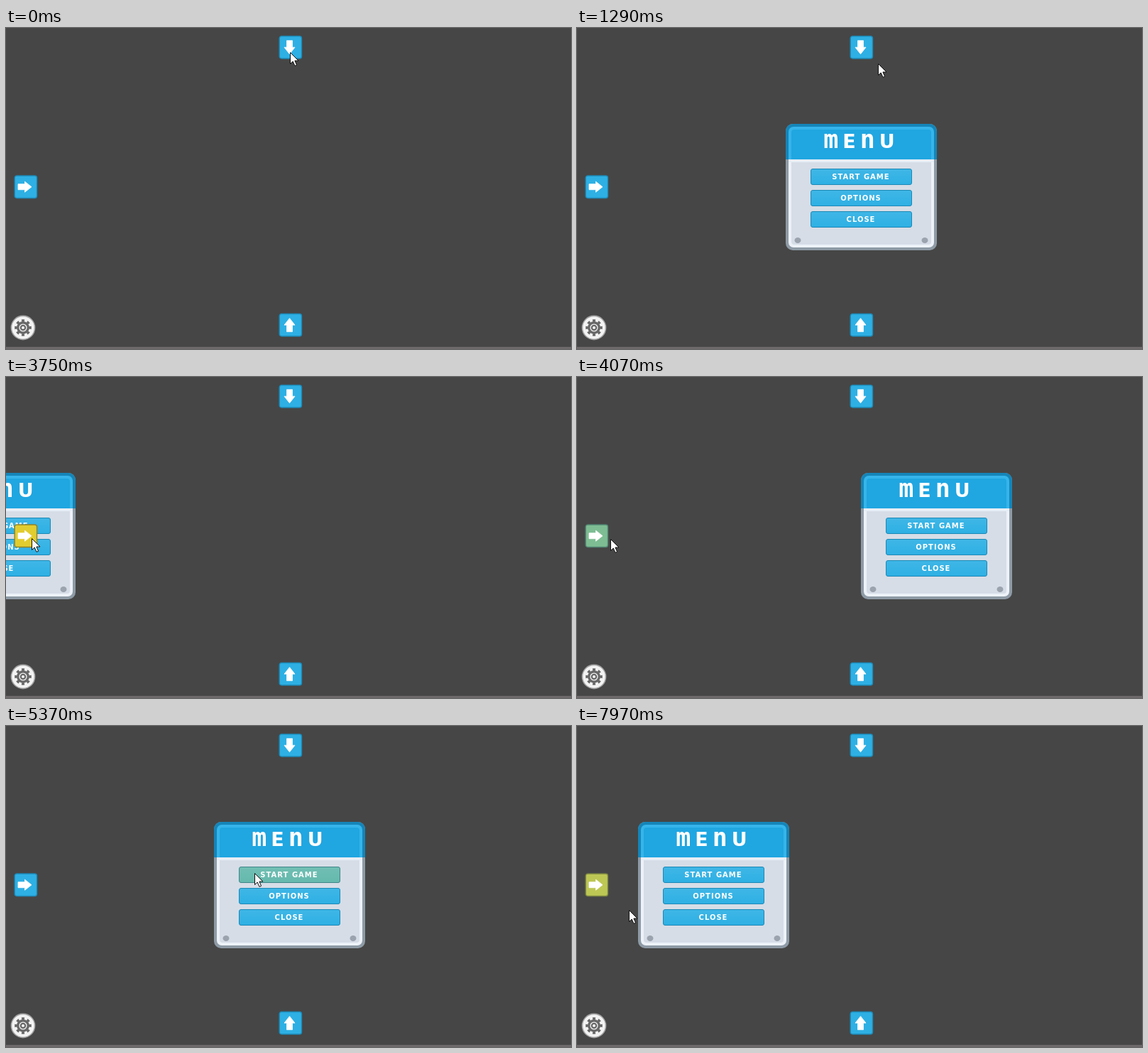
These frames come from a looping animation (796 by 452 pixels, 8 s). An HTML page:

```html
<!DOCTYPE html>
<html lang="en">
<head>
<meta charset="utf-8">
<title>Sliding menu</title>
<style>
  html, body { margin: 0; width: 100%; height: 100%; overflow: hidden; background: #464646; }
  svg { display: block; width: 796px; height: 452px; }
  text { font-family: "DejaVu Sans", sans-serif; font-weight: bold; fill: #fff; text-anchor: middle; }
  .title { font-size: 27px; letter-spacing: 6px; }
  .unicase { font-family: "DejaVu Sans Mono", monospace; font-size: 35px; }
  .label { font-size: 10px; letter-spacing: 1px; }
</style>
</head>
<body>
<svg viewBox="0 0 796 452">
  <defs>
    <linearGradient id="shine" x2="0" y2="1">
      <stop stop-color="#fff" stop-opacity=".08"/>
      <stop offset="1" stop-color="#fff" stop-opacity="0"/>
    </linearGradient>
    <clipPath id="head"><rect width="213" height="50"/></clipPath>
    <path id="arrow" d="M-4-9.5H4V0H7.5L0 9.5-7.5 0H-4Z" fill="#fff" stroke="#fff" stroke-width=".8" stroke-linejoin="round"/>
  </defs>
  <rect width="796" height="452" fill="#464646"/>
  <rect y="449" width="796" height="3" fill="#6d696a"/>

  <g transform="translate(24 422)">
    <circle r="16.6" fill="#f3f3f3" stroke="#a3a3a3" stroke-width="1.6"/>
    <circle r="9" fill="#686868"/>
    <circle r="10" fill="none" stroke="#686868" stroke-width="3.6" pathLength="16" stroke-dasharray="1" stroke-dashoffset=".5"/>
    <circle r="5.6" fill="#f3f3f3"/>
    <circle r="3.2" fill="none" stroke="#686868" stroke-width="2.2"/>
  </g>

  <g id="panel">
    <rect width="213" height="178" rx="10" fill="#8e9ba6"/>
    <rect x="4" y="4" width="205" height="170" rx="7" fill="#edf2f8"/>
    <rect x="8" y="8" width="197" height="162" rx="4" fill="#d6dde7"/>
    <g clip-path="url(#head)">
      <rect width="213" height="178" rx="10" fill="#1585b8"/>
      <rect x="4" y="4" width="205" height="170" rx="7" fill="#36b5ea"/>
      <rect x="8" y="8" width="197" height="162" rx="4" fill="#20a6e1"/>
    </g>
    <rect x="4" y="50" width="205" height="4" fill="#e8eef5"/>
    <text class="title" x="106.5" y="34"><tspan class="unicase">m</tspan>E<tspan class="unicase">n</tspan>U</text>
    <ellipse cx="17" cy="164" rx="4.5" ry="4" fill="#9ba3ae"/>
    <ellipse cx="196" cy="164" rx="4.5" ry="4" fill="#9ba3ae"/>
    <g id="items"></g>
  </g>
  <g id="arrows"></g>
  <path id="cursor" d="M.5.5V16.5L4.2 13 7 19.3 9.6 18.2 6.9 12H12Z" fill="#fff" stroke="#111"/>
</svg>
<script>
const LOOP = 8000, FADE = 200, SLIDE = 890, SPRING = 1960;
const HOME = [294, 135], ABOVE = [294, -181], LEFT = [-266, 135];
const $ = id => document.getElementById(id);
const clamp = v => Math.min(1, Math.max(0, v));
const mix = (a, b, k) => a + (b - a) * k;
const mixColor = (a, b, k) => `rgb(${a.map((v, i) => Math.round(mix(v, b[i], k)))})`;

const quartOut = u => 1 - (1 - u) ** 4;
const elasticOut = u => u <= 0 ? 0 : u >= 1 ? 1
  : 1 + 2 ** (-10 * u) * Math.sin((10 * u - 0.75) * 2 * Math.PI / 3);

const moves = [
  { at: 408, span: SLIDE, from: ABOVE, to: HOME, ease: quartOut },
  { at: 1940, span: SLIDE, from: HOME, to: ABOVE, ease: quartOut },
  { at: 3702.3, span: SPRING, from: LEFT, to: HOME, ease: elasticOut },
  { at: 7873.4, span: SLIDE, from: HOME, to: LEFT, ease: quartOut }
];

// time, x, y of the pointer tip
const path = [
  [0, 400, 34], [400, 400, 34], [680, 432, 46], [930, 436, 50],
  [1180, 430, 54], [1540, 403, 36], [2320, 403, 36], [2700, 208, 121],
  [3310, 36, 227], [3900, 36, 227], [4150, 51, 228], [4480, 51, 228],
  [5200, 330, 205], [5600, 380, 209], [6040, 390, 274], [6210, 390, 274],
  [6490, 388, 234], [6830, 390, 212], [7030, 390, 212], [7400, 220, 176],
  [7800, 36, 222], [7870, 36, 222], [7970, 73, 259], [8000, 80, 264]
];

// hover lists start and end times
const items = [
  { text: 'START GAME', hover: [[5310, 5640], [6640, 7080]] },
  { text: 'OPTIONS', hover: [[5690, 5850], [6330, 6610]] },
  { text: 'CLOSE', hover: [[5880, 6280]] }
];
const arrows = [
  { x: 385, y: 11, turn: 0, hover: [[90, 480], [1350, 2340]] },
  { x: 12, y: 207.5, turn: -90, hover: [[3220, 3960], [7600, 7930]] },
  { x: 385, y: 402, turn: 180, hover: [] }
];

$('items').innerHTML = items.map(({ text }, i) => `
  <g transform="translate(35 ${63 + 30 * i})">
    <rect class="face" x=".5" y=".5" width="142" height="22" rx="2.5"/>
    <rect x="1" y="1" width="141" height="21" rx="2" fill="url(#shine)"/>
    <text class="label" x="71" y="15">${text}</text>
  </g>`).join('');
$('arrows').innerHTML = arrows.map(({ x, y, turn }) => `
  <g transform="translate(${x} ${y})">
    <rect class="face" x=".2" y=".5" width="31.3" height="31.5" rx="3" stroke-width="1.4"/>
    <use href="#arrow" transform="translate(14.5 16.2) rotate(${turn})"/>
  </g>`).join('');

const buttons = [...items, ...arrows];
document.querySelectorAll('.face').forEach((face, i) => buttons[i].face = face);

function glow(hover, t) {
  return hover.reduce((sum, [on, off]) =>
    sum + clamp((t - on) / FADE) - clamp((t - off) / FADE), 0);
}

function panelAt(t) {
  const move = moves.filter(m => m.at <= t).pop();
  if (!move) return ABOVE;
  const k = move.ease(clamp((t - move.at) / move.span));
  return move.from.map((v, i) => Math.round(mix(v, move.to[i], k)));
}

function cursorAt(t) {
  const next = path.findIndex(p => p[0] > t);
  const a = path[next - 1], b = path[next];
  const u = (t - a[0]) / (b[0] - a[0]), k = u * u * (3 - 2 * u);
  return [1, 2].map(i => Math.round(mix(a[i], b[i], k)));
}

function place(id, [x, y]) {
  $(id).setAttribute('transform', `translate(${x} ${y})`);
}

function draw(now) {
  const t = now % LOOP;
  place('panel', panelAt(t));
  place('cursor', cursorAt(t));
  for (const { face, hover } of buttons) {
    const k = clamp(glow(hover, t));
    face.setAttribute('fill', mixColor([46, 176, 228], [226, 205, 47], k));
    face.setAttribute('stroke', mixColor([28, 137, 182], [146, 131, 34], k));
  }
}

const start = performance.now();
function tick() {
  draw(performance.now() - start);
  requestAnimationFrame(tick);
}
tick();
</script>
</body>
</html>
```
